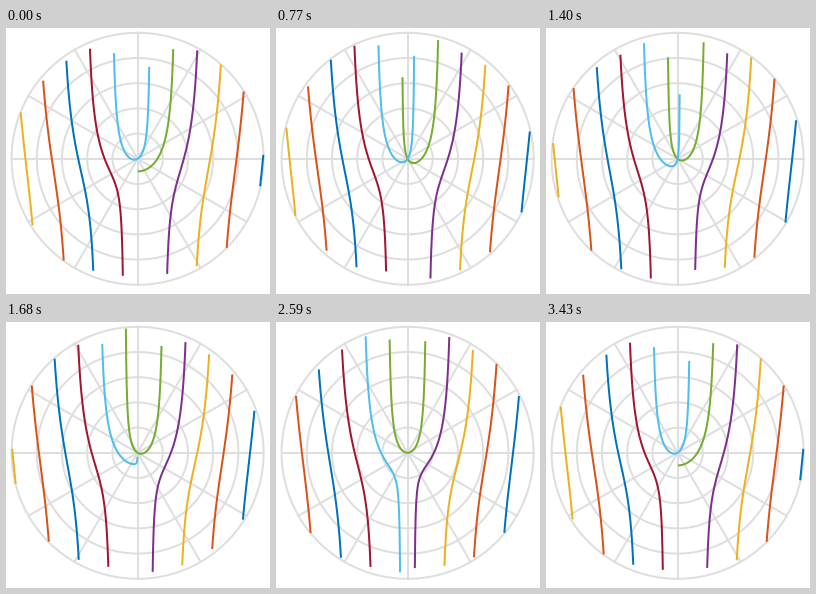
Write a matplotlib script that moves like this. It is 264 px wide and 266 px high and loops after 3.5 s.

```python
import numpy as np
import matplotlib.pyplot as plt
from matplotlib.animation import FuncAnimation

WIDTH, HEIGHT, DPI = 264, 266, 100
FRAMES, INTERVAL = 50, 70
CX, CY, RADIUS = 131.6, 130.8, 126.0
GRID = "#dedede"
COLORS = ["#0072bd", "#d95319", "#edb120", "#7e2f8e",
          "#77ac30", "#4dbeee", "#a2142f"]
SCALE = 0.1                    # r = SCALE * (offset - theta) / sin(theta)
SPACING = 2 * np.pi / 3
THETA = np.arange(1, 100) * np.pi / 100
PX = 72 / DPI                  # one pixel in points

fig = plt.figure(figsize=(WIDTH / DPI, HEIGHT / DPI), dpi=DPI, facecolor="white")
ax = fig.add_axes([0, 0, 1, 1])
ax.set_xlim(0, WIDTH)
ax.set_ylim(HEIGHT, 0)
ax.axis("off")


def to_stage(r, theta):
    """Polar to pixels, theta clockwise from straight up."""
    return CX + RADIUS * r * np.sin(theta), CY - RADIUS * r * np.cos(theta)


def draw_grid():
    style = dict(color=GRID, lw=2 * PX, zorder=1)
    turn = np.linspace(0, 2 * np.pi, 361)
    for r in np.arange(1, 6) / 5:
        ax.plot(*to_stage(r, turn), **style)
    for angle in np.arange(6) * np.pi / 6:
        ax.plot(*to_stage(np.array([-1, 1]), angle), **style)


draw_grid()
curves = [ax.plot([], [], lw=2 * PX, color=COLORS[i % len(COLORS)],
                  solid_capstyle="butt", solid_joinstyle="round", zorder=2)[0]
          for i in range(12)]


def visible_curves(shift):
    """Curves inside the disc, from right to left."""
    for k in range(8, -8, -1):
        offset = np.pi / 3 + k * SPACING - shift
        r = SCALE * (offset - THETA) / np.sin(THETA)
        inside = np.abs(r) <= 1
        if inside.any():
            yield to_stage(r[inside], THETA[inside])


def update(frame):
    shift = SPACING * frame / (FRAMES - 1)
    for curve in curves:
        curve.set_data([], [])
    for curve, points in zip(curves, visible_curves(shift)):
        curve.set_data(*points)
    return curves


anim = FuncAnimation(fig, update, frames=FRAMES, interval=INTERVAL,
                     repeat=True, repeat_delay=0, blit=False)
plt.show()
```
